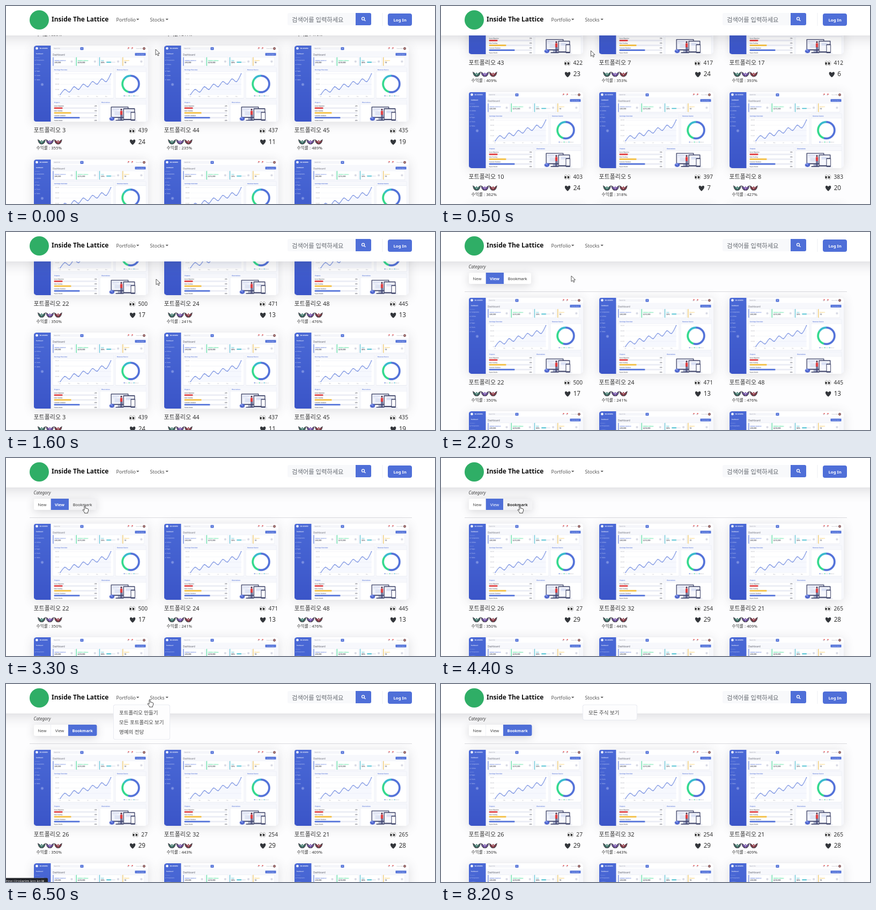
Recreate the animation shown at these times as an HTML page with a canvas. Size 800 by 370 pixels, loop 8300 ms.

```html
<!DOCTYPE html>
<html lang="ko">
<head>
<meta charset="utf-8">
<title>Portfolio list</title>
<style>
  html, body { margin: 0; width: 100%; height: 100%; overflow: hidden; background: #fdfdfe; }
  canvas { display: block; width: 800px; height: 370px; }
</style>
</head>
<body>
<canvas id="stage" width="800" height="370"></canvas>
<script>
const LOOP = 8300, STEP = 100;
const BLUE = '#4f6fd8', GREEN = '#2fd98b', TEAL = '#36b9cc', YELLOW = '#f3bd3c', RED = '#df3a3c';
const FONT = '"Noto Sans", "Noto Sans CJK KR", sans-serif';
const THUMB = { w: 213, h: 142, scale: 2 };
const COLUMNS = [51.5, 294.5, 537.5], FIRST_ROW = 122.5, ROW_PITCH = 212.7;
const CLICK_BOOKMARK = 4400, OPEN_PORTFOLIO = 5700, OPEN_STOCKS = 6700;

// Each card: portfolio number, views, hearts, return in percent
const BY_VIEWS = [
  [[22, 500, 17, 350], [24, 471, 13, 241], [48, 445, 13, 476]],
  [[3, 439, 24, 355], [44, 437, 11, 235], [45, 435, 19, 489]],
  [[43, 422, 23, 409], [7, 417, 24, 353], [17, 412, 6, 393]],
  [[10, 403, 24, 362], [5, 397, 7, 318], [8, 383, 20, 427]],
  [[31, 371, 15, 344], [12, 365, 21, 298], [29, 358, 9, 401]]
];
const BY_BOOKMARK = [
  [[26, 27, 29, 350], [32, 254, 29, 443], [21, 265, 28, 409]],
  [[14, 301, 27, 372], [38, 183, 27, 255], [2, 346, 26, 390]]
];

const SCROLL = [[0, 261], [500, 600], [800, 640], [1000, 567], [1600, 147], [1900, 0]];
const POINTER = [
  [0, 279, 81], [1000, 280, 86], [1600, 280, 88], [1900, 280, 88], [2200, 243, 82],
  [2800, 150, 88], [3200, 147, 89], [4500, 147, 89], [5300, 225, 24], [5800, 226, 27],
  [6150, 236, 62], [6500, 268, 29], [6900, 270, 29], [7300, 288, 50], [7700, 288, 50], [8100, 280, 27]
];

const ctx = document.getElementById('stage').getContext('2d');
ctx.imageSmoothingQuality = 'high';

function track(keys, t) {
  const next = keys.findIndex(k => k[0] > t);
  if (next < 0) return keys[keys.length - 1].slice(1);
  const a = keys[next - 1], b = keys[next];
  const p = (t - a[0]) / (b[0] - a[0]);
  return a.slice(1).map((v, i) => v + (b[i + 1] - v) * p);
}

function text(c, str, x, y, size, color, weight = 400, align = 'left') {
  c.font = `${weight} ${size}px ${FONT}`;
  c.textAlign = align;
  c.fillStyle = color;
  c.fillText(str, x, y);
  return c.measureText(str).width;
}

function rect(c, x, y, w, h, color, radius = 0) {
  c.fillStyle = color;
  c.beginPath();
  c.roundRect(x, y, w, h, radius);
  c.fill();
}

function disc(c, x, y, rx, color, ry = rx) {
  c.fillStyle = color;
  c.beginPath();
  c.ellipse(x, y, rx, ry, 0, 0, Math.PI * 2);
  c.fill();
}

function poly(c, points, color, outline) {
  c.beginPath();
  points.forEach(([x, y]) => c.lineTo(x, y));
  c.closePath();
  c.fillStyle = color;
  c.fill();
  if (outline) { c.strokeStyle = outline; c.stroke(); }
}

function shadowed(c, blur, offset, color, draw) {
  c.save();
  c.shadowBlur = blur;
  c.shadowOffsetY = offset;
  c.shadowColor = color;
  draw();
  c.restore();
}

function panel(c, x, y, w, h, title) {
  rect(c, x - .4, y - .4, w + .8, h + 1.2, '#e4e7f1', 1);
  rect(c, x, y, w, h, '#fff', 1);
  if (!title) return;
  rect(c, x, y, w, 7.5, '#f7f8fc');
  rect(c, x, y + 7.5, w, .5, '#e3e6f0');
  text(c, title, x + 2.5, y + 4.8, 2.6, BLUE, 700);
}

function drawSidebar(c) {
  const fill = c.createLinearGradient(0, 0, 0, THUMB.h);
  fill.addColorStop(0, '#4a69d6');
  fill.addColorStop(1, '#3b55c8');
  rect(c, 0, 0, 32, THUMB.h, fill);
  disc(c, 6, 5, 2.3, '#fff');
  text(c, 'SB ADMIN', 11, 6.2, 3, '#fff', 700);
  text(c, 'Dashboard', 4.5, 16, 2.4, '#fff', 700);
  [['Components', 28], ['Utilities', 36], ['Pages', 48.5], ['Charts', 56.5], ['Tables', 64.5]].forEach(([label, y]) => {
    disc(c, 3, y - .8, .7, '#a9b8ee');
    text(c, label, 5, y, 2.4, '#d5dcf7');
  });
  text(c, 'INTERFACE', 2.5, 23, 1.8, '#93a5e6');
  text(c, 'ADDONS', 2.5, 43, 1.8, '#93a5e6');
  disc(c, 16, 72.5, 2.6, '#7389de');
  text(c, '‹', 16, 73.7, 3.5, '#d5dcf7', 400, 'center');
}

function drawTopbar(c) {
  rect(c, 32, 0, 181, 10, '#fff');
  rect(c, 36, 2.7, 51, 5.4, '#f5f6fa', 1);
  text(c, 'Search for', 38, 6.2, 2.4, '#858796');
  rect(c, 87, 2.7, 6, 5.4, BLUE, 1);
  disc(c, 90, 5.3, .8, '#fff');
  [176, 183].forEach(x => {
    disc(c, x, 5.7, 1.2, '#c9ccd8');
    rect(c, x, 3.3, 2.2, 1.8, RED, .6);
  });
  text(c, 'Doran Milbe', 203, 6.2, 2.1, '#858796', 400, 'right');
  disc(c, 206, 5.3, 2.4, '#6b3b43');
  disc(c, 206, 5.2, 1.1, '#e9b6a2');
  text(c, 'Dashboard', 35.5, 18.3, 4.4, '#5a5c69');
  rect(c, 189, 13.5, 20, 5, BLUE, .8);
  text(c, 'Generate Report', 199, 16.8, 1.9, '#fff', 400, 'center');
}

function drawStats(c) {
  const stats = [
    ['EARNINGS (MONTHLY)', '$40,000', BLUE], ['EARNINGS (ANNUAL)', '$215,000', GREEN],
    ['TASKS', '50%', TEAL], ['REQUESTS', '18', YELLOW]
  ];
  stats.forEach(([label, value, color], i) => {
    const x = 36 + i * 43.3;
    panel(c, x, 21.5, 40, 16);
    rect(c, x, 21.5, 1, 16, color);
    text(c, label, x + 3, 28.3, 1.9, color, 700);
    text(c, value, x + 3, 32.4, 3.2, '#5a5c69', 700);
    disc(c, x + 35, 29.5, 2, '#d7d9e4');
    if (i === 2) {
      rect(c, x + 13, 30, 17, 1.6, '#e6e8f0', .8);
      rect(c, x + 13, 30, 9, 1.6, color, .8);
    }
  });
}

function drawCharts(c) {
  panel(c, 36, 41, 113, 57, 'Earnings Overview');
  c.lineWidth = .4;
  for (let i = 0; i < 5; i++) {
    const y = 91.5 - i * 9.8;
    rect(c, 49.5, y, 95, .4, '#e6e8f1');
    text(c, i ? `$${i}0,000` : '$0', 47.5, y + .8, 2, '#858796', 400, 'right');
  }
  ['Jan', 'Mar', 'May', 'Jul', 'Sep', 'Nov'].forEach((m, i) => text(c, m, 49.5 + i * 17.2, 95.4, 2, '#858796', 400, 'center'));
  const values = [0, 10, 5, 15, 10, 20, 15, 25, 20, 30, 25, 40];
  const pts = values.map((v, i) => [49.5 + i * 8.6, 91.5 - v * .98]);
  const at = i => pts[Math.max(0, Math.min(pts.length - 1, i))];
  const curve = () => {
    c.beginPath();
    c.moveTo(...pts[0]);
    for (let i = 0; i < pts.length - 1; i++) {
      const [p, a, b, n] = [at(i - 1), at(i), at(i + 1), at(i + 2)];
      c.bezierCurveTo(a[0] + (b[0] - p[0]) * .17, a[1] + (b[1] - p[1]) * .17,
        b[0] - (n[0] - a[0]) * .17, b[1] - (n[1] - a[1]) * .17, ...b);
    }
  };
  curve();
  c.lineTo(144.1, 91.5);
  c.fillStyle = 'rgba(78,115,223,.05)';
  c.fill();
  curve();
  c.strokeStyle = BLUE;
  c.lineWidth = .9;
  c.stroke();
  pts.forEach(([x, y]) => disc(c, x, y, .8, BLUE));

  panel(c, 153, 41, 56.5, 57, 'Revenue Source');
  c.lineWidth = 3.7;
  let from = 0;
  [[.55, BLUE], [.3, GREEN], [.15, TEAL]].forEach(([share, color], i) => {
    c.beginPath();
    c.arc(181, 71.5, 15.4, (from - .25) * Math.PI * 2, (from + share - .25) * Math.PI * 2);
    c.strokeStyle = color;
    c.stroke();
    from += share;
    disc(c, 169 + i * 9, 93.7, .9, color);
    text(c, ['Direct', 'Social', 'Referral'][i], 170.4 + i * 9, 94.4, 1.9, '#858796');
  });
}

function drawIllustration(c) {
  const navy = '#343a61';
  rect(c, 141, 140, 52, .6, '#c5cae0');
  rect(c, 144, 114, 33, 21, navy, 1);
  rect(c, 145.3, 115.3, 30.4, 18, '#f1f3fb');
  rect(c, 147, 118, 13, 1.2, '#c9d0ea');
  rect(c, 147, 121, 9, 1.2, '#dfe4f3');
  rect(c, 151, 123, 12, 7, '#dfe4f3');
  rect(c, 157, 135, 7, 4, '#aab1cc');
  rect(c, 153, 138.5, 15, 1.5, navy, .5);
  rect(c, 167, 117, 22, 22, navy, 1);
  rect(c, 168.3, 118.5, 19.4, 18.5, '#f7f8fd');
  rect(c, 172, 121, 10, 5, '#dbe1f4');
  rect(c, 181, 123.5, 8.5, 16.5, navy, 1);
  rect(c, 182, 125.3, 6.5, 12.5, '#fff');
  disc(c, 146, 136.5, 4.8, '#4a60cb', 3.6);
  poly(c, [[142, 135], [146, 132], [148, 138]], '#7990e6');
  disc(c, 163.5, 119.5, 1.6, '#542f45');
  rect(c, 161.5, 121.5, 4.2, 8, RED, 1.3);
  rect(c, 162, 129, 1.5, 10, '#404474');
  rect(c, 164.2, 129, 1.5, 10, '#404474');
}

function makeThumb() {
  const image = document.createElement('canvas');
  image.width = THUMB.w * THUMB.scale;
  image.height = THUMB.h * THUMB.scale;
  const c = image.getContext('2d');
  c.scale(THUMB.scale, THUMB.scale);
  c.beginPath();
  c.roundRect(0, 0, THUMB.w, THUMB.h, 5);
  c.clip();
  rect(c, 0, 0, THUMB.w, THUMB.h, '#f7f8fc');
  drawSidebar(c);
  drawTopbar(c);
  drawStats(c);
  drawCharts(c);
  panel(c, 36, 102, 84.5, 45, 'Projects');
  [['Server Migration', 20, RED], ['Sales Tracking', 40, YELLOW], ['Customer Database', 60, BLUE], ['Payout Details', 80, TEAL]].forEach(([label, share, color], i) => {
    const y = 115.2 + i * 9;
    text(c, label, 38, y - 1.6, 2.2, '#5a5c69', 700);
    text(c, share + '%', 118, y - 1.6, 2.2, '#5a5c69', 700, 'right');
    rect(c, 38, y, 80, 2.8, '#eaecf4', 1);
    rect(c, 38, y, share * .8, 2.8, color, 1);
  });
  panel(c, 124, 102, 85.5, 45, 'Illustrations');
  drawIllustration(c);
  return image;
}

function drawEyes(x, y) {
  ctx.lineWidth = .6;
  ctx.strokeStyle = '#777';
  [0, 5.6].forEach(dx => {
    disc(ctx, x + 2.7 + dx, y, 2.4, '#fff', 4.2);
    ctx.stroke();
    disc(ctx, x + 2.1 + dx, y + .5, 1.5, '#222', 2.3);
  });
}

function drawHeart(x, y) {
  ctx.fillStyle = '#33363b';
  ctx.beginPath();
  ctx.moveTo(x, y + 5.3);
  ctx.bezierCurveTo(x - 9, y - 1.5, x - 4.5, y - 8, x, y - 3);
  ctx.bezierCurveTo(x + 4.5, y - 8, x + 9, y - 1.5, x, y + 5.3);
  ctx.fill();
}

function drawCrest(x, y, color) {
  [-1, 1].forEach(side => {
    poly(ctx, [[1, 2], [3, -2], [7.5, -5], [6.8, -1], [5.5, 1.8], [3, 4.4], [0, 5]].map(([dx, dy]) => [x + dx * side, y + dy]), '#4a4750');
    poly(ctx, [[2, 1], [3.6, -1.3], [6.2, -2.8], [5, 0], [2.6, 3]].map(([dx, dy]) => [x + dx * side, y + dy]), color);
  });
  poly(ctx, [[x, y - 3.5], [x + 2.3, y], [x, y + 5.5], [x - 2.3, y]], color);
  disc(ctx, x, y + .3, 1, '#ddd0dc');
}

const thumb = makeThumb();

function drawCard(x, y, [id, views, hearts, rate]) {
  shadowed(ctx, 20, 3, 'rgba(58,59,69,.17)', () => rect(ctx, x, y, THUMB.w, THUMB.h, '#f7f8fc', 5));
  ctx.drawImage(thumb, x, y, THUMB.w, THUMB.h);
  text(ctx, `포트폴리오 ${id}`, x, y + 162, 11, '#333');
  const viewWidth = text(ctx, views, x + 212.5, y + 162, 10.2, '#333', 400, 'right');
  drawEyes(x + 196 - viewWidth, y + 159);
  const heartWidth = text(ctx, hearts, x + 208.5, y + 183.5, 11.7, '#333', 400, 'right');
  drawHeart(x + 198 - heartWidth, y + 180);
  drawCrest(x + 15, y + 179.5, '#347a68');
  drawCrest(x + 30.3, y + 179.5, '#7751b5');
  drawCrest(x + 45.7, y + 179.5, '#96343f');
  text(ctx, `수익률 : ${rate}%`, x + 5, y + 194, 7.8, '#333', 500);
}

function drawCategory(t, scroll) {
  ctx.save();
  ctx.translate(0, -scroll);
  text(ctx, 'Category', 51.5, 68, 8, '#444', 'italic 400');
  const marked = t >= CLICK_BOOKMARK;
  const hover = t >= 2700 && t < 4700;
  const split = marked ? 116 : 117, end = marked ? 169.5 : 168;
  shadowed(ctx, 16, 3, 'rgba(58,59,69,.2)', () => rect(ctx, 52, 76, end - 52, 21, '#fff', 3));
  const blueBookmark = t > CLICK_BOOKMARK;
  if (blueBookmark) rect(ctx, split, 76, end - split, 21, BLUE, [0, 3, 3, 0]);
  else {
    if (hover) rect(ctx, split, 76, end - split, 21, '#f3f3f5', [0, 3, 3, 0]);
    rect(ctx, 83.5, 76, split - 83.5, 21, BLUE);
  }
  rect(ctx, 83, 76, .6, 21, '#e8eaf0');
  text(ctx, 'New', 67.5, 89.5, 7.6, '#444', 400, 'center');
  text(ctx, 'View', 100, 89.5, 7.6, blueBookmark ? '#444' : '#fff', marked ? 400 : 700, 'center');
  text(ctx, 'Bookmark', 142.6, 89.5, 7.4, blueBookmark ? '#fff' : '#333', marked ? 700 : 400, 'center');
  rect(ctx, 44, 111, 713, 1, '#dadade');
  ctx.restore();
}

function drawCaret(x) {
  poly(ctx, [[x, 23.8], [x + 5.4, 23.8], [x + 2.7, 26.6]], '#555');
}

function drawHeader() {
  shadowed(ctx, 24, 3, 'rgba(58,59,69,.2)', () => rect(ctx, -30, -20, 860, 75, '#fff'));
  disc(ctx, 62, 26, 18, '#2fae66');
  text(ctx, 'Inside The Lattice', 85, 28.5, 12, '#111', 700);
  text(ctx, 'Portfolio', 205.5, 29, 9, '#555');
  drawCaret(243);
  text(ctx, 'Stocks', 268.5, 29, 9, '#555');
  drawCaret(297.5);
  rect(ctx, 525, 13, 127, 23, '#f8f9fb', [3, 0, 0, 3]);
  text(ctx, '검색어를 입력하세요', 533, 29.5, 11.3, '#666b72');
  rect(ctx, 652, 13, 29, 23, BLUE, [0, 3, 3, 0]);
  ctx.strokeStyle = '#fff';
  ctx.lineWidth = 1.3;
  ctx.beginPath();
  ctx.arc(666, 23.7, 2.5, 0, Math.PI * 2);
  ctx.moveTo(668, 25.7);
  ctx.lineTo(670.4, 28);
  ctx.stroke();
  rect(ctx, 701.5, 13, 1, 24, '#eceef4');
  rect(ctx, 712, 14, 45, 23, BLUE, 4);
  text(ctx, 'Log In', 734.6, 28.7, 7.8, '#fff', 700, 'center');
}

function drawMenu(x, w, items) {
  const h = items.length * 18.2 + 11;
  rect(ctx, x, 38.5, w, h, '#e4e6ee', 4);
  rect(ctx, x + .8, 39.3, w - 1.6, h - 1.6, '#fdfdfe', 3.5);
  items.forEach((item, i) => text(ctx, item, x + 11, 56.5 + i * 18.2, 9.5, '#444'));
}

function drawArrow(x, y) {
  ctx.lineWidth = .9;
  poly(ctx, [[0, 0], [0, 10.6], [2.5, 8.4], [4.2, 12], [6, 11.2], [4.4, 7.7], [7.6, 7.5]].map(([dx, dy]) => [x + dx, y + dy]), '#fff', '#444');
}

function drawHand(x, y) {
  ctx.lineWidth = .9;
  ctx.lineJoin = 'round';
  poly(ctx, [[-1, .7], [0, 0], [1, .7], [1, 5], [3, 5], [5, 5.6], [6.6, 6.6], [6.6, 10], [5.4, 12.2], [5.4, 14], [-.5, 14], [-.8, 12.2], [-4, 8.4], [-3.4, 7.3], [-1, 8.6]].map(([dx, dy]) => [x + dx, y + dy]), '#fff', '#333');
}

function drawStatus() {
  rect(ctx, 0, 362.5, 78, 8, '#222429', [0, 2, 0, 0]);
  text(ctx, 'https://colarim.kro.kr/#', -4.5, 371, 6.9, '#e6e6e8');
}

function render(t) {
  const [scroll] = track(SCROLL, t);
  const rows = t >= CLICK_BOOKMARK ? BY_BOOKMARK : BY_VIEWS;
  rect(ctx, 0, 0, 800, 370, '#fdfdfe');
  drawCategory(t, scroll);
  rows.forEach((cards, r) => {
    const y = FIRST_ROW + r * ROW_PITCH - Math.round(scroll);
    if (y < 400 && y > -220) cards.forEach((card, i) => drawCard(COLUMNS[i], y, card));
  });
  drawHeader();
  if (t >= OPEN_STOCKS) drawMenu(264, 102, ['모든 주식 보기']);
  else if (t >= OPEN_PORTFOLIO) drawMenu(200, 106, ['포트폴리오 만들기', '모든 포트폴리오 보기', '명예의 전당']);
  if (t >= 8200) return;
  if (t >= 5500) drawStatus();
  const hand = t >= 2700 && t < 4700 || t >= 5200;
  (hand ? drawHand : drawArrow)(...track(POINTER, t));
}

function tick(now) {
  render(Math.floor(now % LOOP / STEP) * STEP);
  requestAnimationFrame(tick);
}
requestAnimationFrame(tick);
</script>
</body>
</html>
```
